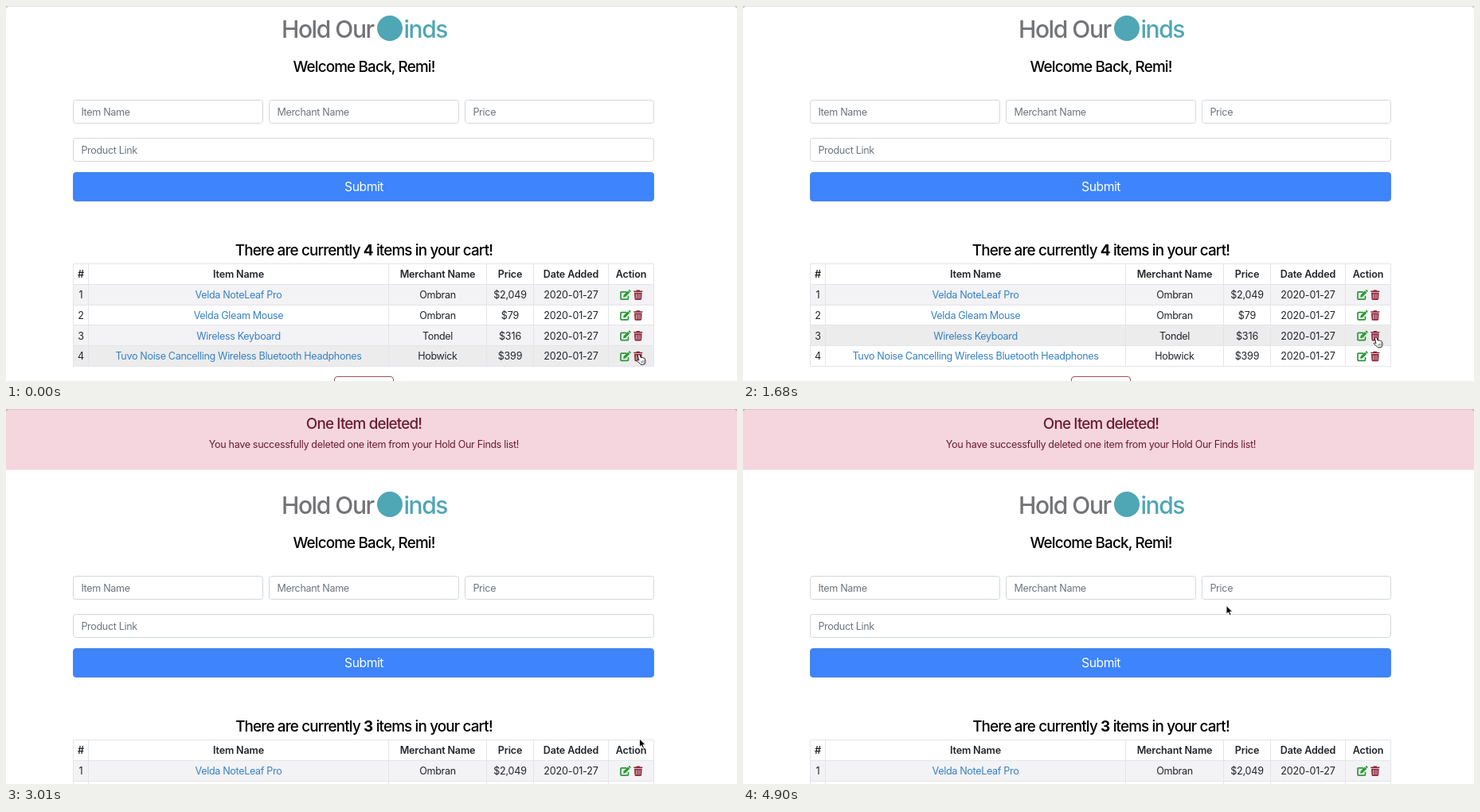
These frames come from a looping animation (918 by 472 pixels, 4.97 s). An HTML page:

```html
<!DOCTYPE html>
<html lang="en">
<head>
<meta charset="utf-8">
<title>Shopping list</title>
<style>
html, body { margin: 0; width: 100%; height: 100%; overflow: hidden; background: #fff; }
svg { display: block; width: 918px; height: 472px; }
text { font-family: Inter, "Open Sans", sans-serif; font-size: 12.56px; letter-spacing: -0.026em; fill: #212529; white-space: pre; }
.mid { text-anchor: middle; }
.title { font-size: 18.84px; font-weight: 500; letter-spacing: -0.044em; fill: #000; }
.brand { font-size: 30px; font-weight: 500; letter-spacing: -0.048em; fill: #737477; }
.teal { fill: #4fa6b5; }
.hint { fill: #6c757d; }
.btn { font-size: 15.7px; fill: #fff; letter-spacing: -0.03em; }
.head { font-weight: 600; letter-spacing: -0.012em; }
.num { letter-spacing: -0.014em; }
.link { fill: #3680c4; }
.alert { fill: #6a1b33; }
.bold { font-weight: 700; }
.field { fill: #fff; stroke: #d3d7dc; }
.grid { fill: none; stroke: #e3e5e9; }
</style>
</head>
<body>
<svg id="stage" viewBox="0 0 918 472"></svg>
<script>
const LOOP = 4970, STEP = 70, DELETED = 2310, SHIFT = 92;
const stage = document.getElementById('stage');

const text = (x, y, s, cls) => `<text x="${x}" y="${y}" class="${cls}">${s}</text>`;
const rect = (x, y, w, h, more) => `<rect x="${x}" y="${y}" width="${w}" height="${h}" ${more}/>`;
const field = (x, y, w, hint) =>
  rect(x, y, w, 29, 'rx="3" class="field"') + text(x + 9.9, y + 19.2, hint, 'hint');

// Table geometry
const LEFT = 84.5, RIGHT = 813.5, TOP = 324.5, ROW = 25.75;
const edges = [LEFT, 103.5, 480.5, 603.5, 662.5, 756.5, RIGHT];
const heads = ['#', 'Item Name', 'Merchant Name', 'Price', 'Date Added', 'Action'];
const items = [
  ['Velda NoteLeaf Pro', 'Ombran', '$2,049'],
  ['Velda Gleam Mouse', 'Ombran', '$79'],
  ['Wireless Keyboard', 'Tondel', '$316'],
  ['Tuvo Noise Cancelling Wireless Bluetooth Headphones', 'Hobwick', '$399']
];
const styles = ['mid', 'mid link', 'mid', 'mid num', 'mid num'];
const center = i => (edges[i] + edges[i + 1]) / 2;

const icons = y => `<g transform="translate(771 ${y})">
  <path d="M8.3 2.6H1.9Q1 2.6 1 3.5V11Q1 11.9 1.9 11.9H9.6Q10.5 11.9 10.5 11V7.6" fill="none" stroke="#2a9a37" stroke-width="1.7"/>
  <path d="M4.2 9.4L4.6 6.6 10 1.2 12.3 3.5 6.9 9ZM10.6 .7L11.3 0Q11.8-.4 12.4 .1L13.5 1.2Q14 1.8 13.5 2.3L12.8 3Z" fill="#2a9a37"/>
  <path d="M17.3 1.3H20.2L21 .3H24.6L25.4 1.3H28.3V2.7H17.3ZM18 3.5H27.6L27.1 11.6Q27 12.7 25.9 12.7H19.7Q18.6 12.7 18.5 11.6Z" fill="#8c2438"/>
  <path d="M20.5 5V11.2M22.8 5V11.2M25.1 5V11.2" stroke="#f0d8dd" stroke-width=".9"/></g>`;

function table(rows, hover) {
  const bottom = TOP + ROW * (rows.length + 1);
  let fills = '', lines = '', cells = '';
  heads.forEach((h, i) => cells += text(center(i), TOP + 17.6, h, 'mid head'));
  rows.forEach((r, n) => {
    const y = TOP + ROW * (n + 1);
    const color = n === hover ? '#ececed' : n % 2 ? '#fff' : '#f3f2f5';
    fills += rect(LEFT, y, RIGHT - LEFT, ROW, `fill="${color}"`);
    [n + 1, ...r, '2020-01-27'].forEach((s, i) =>
      cells += text(center(i), y + 17.8, s, styles[i]));
    cells += icons(y + 7);
  });
  for (let n = 0; n <= rows.length + 1; n++) {
    const y = Math.floor(TOP + ROW * n) + .5;
    lines += `M${LEFT} ${y}H${RIGHT}`;
  }
  edges.forEach(x => lines += `M${x} ${TOP}V${bottom}`);
  return fills + `<path class="grid" d="${lines}"/>` + cells +
    rect(412.5, bottom + 13.25, 74, 30, 'rx="3.5" fill="#fff" stroke="#98505f"');
}

const form = count =>
  text(346, 39.5, 'Hold Our', 'brand') +
  '<circle cx="482" cy="28" r="16" class="teal"/>' +
  text(499.5, 39.5, 'inds', 'brand teal') +
  text(449.5, 83, 'Welcome Back, Remi!', 'mid title') +
  field(84.5, 118.5, 238, 'Item Name') +
  field(330.5, 118.5, 238, 'Merchant Name') +
  field(576.5, 118.5, 237, 'Price') +
  field(84.5, 166.5, 729, 'Product Link') +
  rect(84.5, 209.5, 729, 36, 'rx="3.5" fill="#3d84fd" stroke="#5089e4"') +
  text(449.5, 233.2, 'Submit', 'mid btn') +
  text(449.5, 314, `There are currently <tspan class="bold">${count}</tspan> items in your cart!`, 'mid title');

const alertBox = rect(0, 0, 918, 76.6, 'fill="#f5d6de"') +
  text(449.5, 25, 'One Item deleted!', 'mid title alert') +
  text(449.5, 49, 'You have successfully deleted one item from your Hold Our Finds list!', 'mid alert');

const frameEdge = '<path d="M0 0H918V3L915 .6H3L0 3Z" fill="#888" opacity=".45"/>';

const arrow = '<path d="M0 0V10.6L2.5 8.4 4.2 12.2 6 11.4 4.4 7.7H7.7Z" fill="#000" stroke="#fff" stroke-width=".9"/>';
const hand = `<path d="M1.1-.1Q2.3-.9 3 .4L4.2 3.6Q5.1 2.8 6 3.7 7 3.1 7.7 4.1 8.9 3.8 9.3 5L10 8.2Q10 9.8 9.2 11.6L4.7 12.7Q3.6 10.9 1.4 9.6-.6 8.2-.8 7 .1 5.9 1.9 7.1L.5 1.2Q.4 .3 1.1-.1Z"
  fill="#fff" stroke="#222" stroke-width="1"/><path d="M4.7 7.8L5.4 10.6M6.4 7.4L7 10.2M8 7L8.6 9.8" stroke="#444" stroke-width=".7"/>`;

// Pointer stops: time, x, y
const stops = [
  [0, 793, 439], [560, 793, 439], [840, 797, 426], [1120, 793, 417.5],
  [2100, 793, 417.5], [2170, 795.5, 415], [3360, 795.5, 415],
  [3780, 785.5, 399], [4130, 785.5, 399], [4900, 607, 247.5], [LOOP, 607, 247.5]
];
const ease = p => p * p * (3 - 2 * p);

function pointer(t) {
  const i = stops.findIndex(s => s[0] > t);
  const [t0, x0, y0] = stops[i - 1], [t1, x1, y1] = stops[i];
  const p = ease((t - t0) / (t1 - t0));
  const isHand = t < 700 || (t >= 1050 && t < 2170);
  return `<g transform="translate(${x0 + (x1 - x0) * p} ${y0 + (y1 - y0) * p})">${isHand ? hand : arrow}</g>`;
}

const before = hover => form(4) + table(items, hover);
const after = alertBox + `<g transform="translate(0 ${SHIFT})">` +
  form(3) + table(items.filter((_, i) => i !== 2), -1) + '</g>';

function draw(t) {
  const page = t >= DELETED ? after : before(t < 980 ? 3 : 2);
  stage.innerHTML = rect(0, 0, 918, 472, 'fill="#fff"') + page + frameEdge + pointer(t);
}

let shown = -1;
const start = performance.now();
function tick(now) {
  const t = Math.floor(Math.max(0, now - start) % LOOP / STEP) * STEP;
  if (t !== shown) draw(shown = t);
  requestAnimationFrame(tick);
}
tick(start);
</script>
</body>
</html>
```
